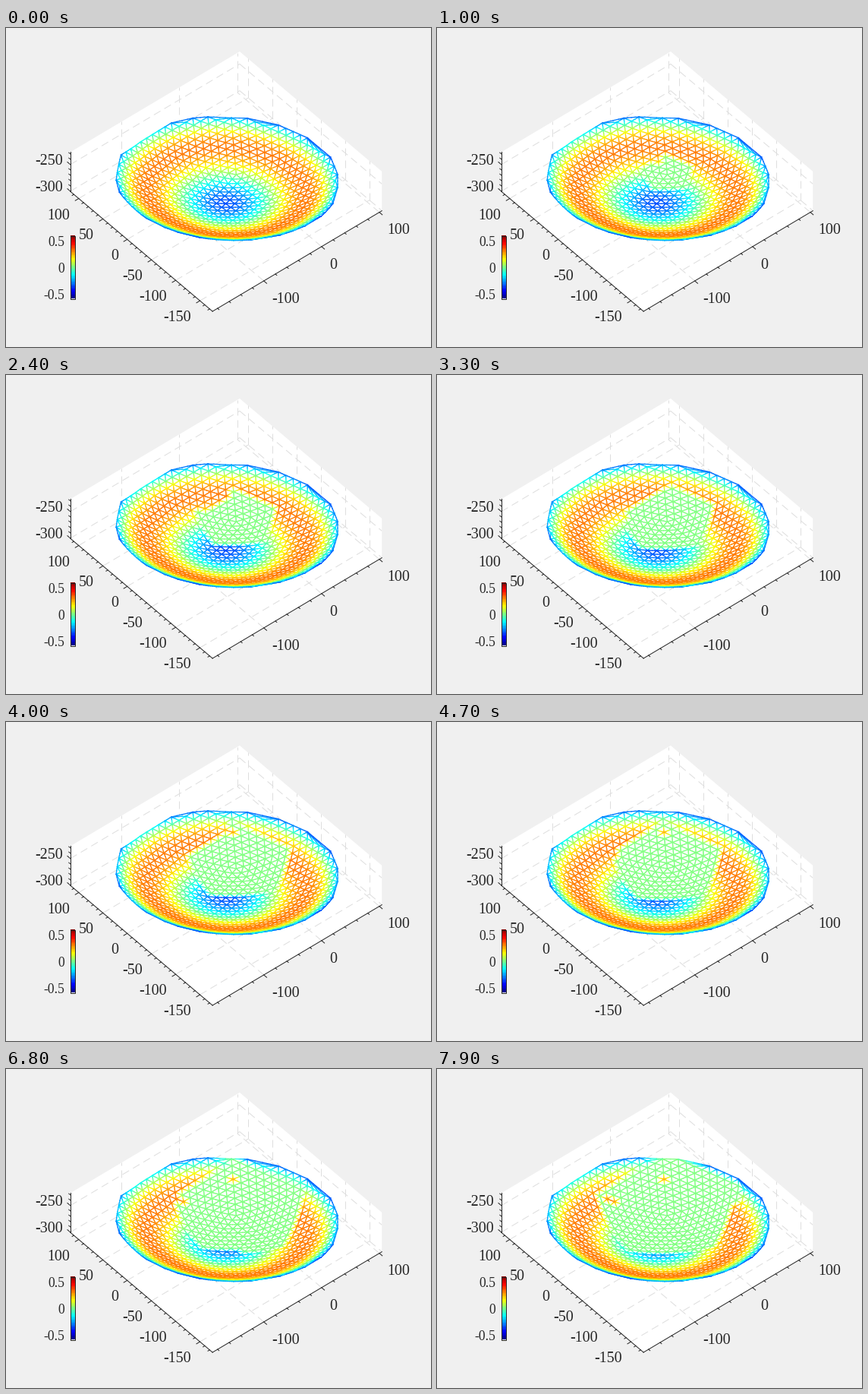
Animation, 560 px wide and 420 px high, one loop 8 s. Source, as a matplotlib script:

```python
import numpy as np
import matplotlib.pyplot as plt
from matplotlib.animation import FuncAnimation
from matplotlib.collections import LineCollection
from matplotlib.tri import Triangulation

W, H, DPI = 560, 420, 100
FRAMES, STEP = 80, 100
PX = 72 / DPI
INK = (0.15, 0.15, 0.15)
GRID = (0.87, 0.87, 0.87)

# Orthographic view: azimuth -40, elevation 45
LO = np.array([-188.7, -175.9, -300.4])
HI = np.array([104.3, 117.3, -226.6])
SCALE = 0.994
CA, SA = np.cos(np.radians(40)), np.sin(np.radians(40))
S45 = np.sqrt(0.5)


def project(p):
    q = np.asarray(p, float) - (LO + HI) / 2
    x, y, z = q[..., 0], q[..., 1], q[..., 2]
    u = 290 + SCALE * (CA * x - SA * y)
    v = 202 - SCALE * S45 * (SA * x + CA * y + z)
    return np.stack([u, v], axis=-1)


def jet(t):
    t = np.asarray(t, float)[..., None]
    return np.clip(1.5 - np.abs(4 * t - np.array([3, 2, 1])), 0, 1)


# Geodesic dish: five icosahedron faces around the pole, rings counted from it
R = 300.4
FREQ = 32
AXIS = -np.array([0.1642, 0.1228, 0.9788])
AXIS /= np.linalg.norm(AXIS)
POLE = np.array([0.0, 0.0, -1.0])
STUCK = {(6, 0, 0), (7, 4, 0), (8, 4, 0)}


def vertex(i):
    a, t = np.radians(54 - 72 * i), np.arctan(2)
    return np.array([np.sin(t) * np.cos(a), np.sin(t) * np.sin(a), -np.cos(t)])


def slerp(a, b, t):
    w = np.arccos(np.clip(a @ b, -1, 1))
    return (np.sin((1 - t) * w) * a + np.sin(t * w) * b) / np.sin(w)


def row_point(p, q, s, a, b, c):
    t = 1 - a / FREQ
    return slerp(slerp(p, q, t), slerp(p, s, t), c / (b + c))


def face_point(i, ring, j):
    """Mean of the three great-circle rows that meet at one node."""
    p, q, s = POLE, vertex(i), vertex(i + 1)
    a, b, c = FREQ - ring, ring - j, j
    m = (row_point(p, q, s, a, b, c) + row_point(q, s, p, b, c, a)
         + row_point(s, p, q, c, a, b))
    return m / np.linalg.norm(m)


def build_nodes():
    pts, free = [POLE], [True]
    for ring in range(1, 25):
        for i in range(5):
            for j in range(ring):
                p = face_point(i, ring, j)
                if R * np.linalg.norm(np.cross(p, AXIS)) <= 150:
                    pts.append(p)
                    free.append((ring, i, j) not in STUCK)
    return R * np.array(pts), np.array(free)


nodes, free = build_nodes()
order = np.arange(len(nodes))

# Offset between the sphere and the ideal paraboloid
drop = 0.36
depth = nodes @ AXIS
rho2 = R ** 2 - depth ** 2
offset = (rho2 / (4 * (0.466 * R + drop)) - R - drop + depth) * depth / R

tri = Triangulation(nodes[:, 0], nodes[:, 1])
edges = tri.edges
flat = project(nodes)

# Each edge is split so its colour can blend from end to end
PARTS = 4
cuts = np.linspace(0, 1, PARTS + 1)
mids = (cuts[:-1] + cuts[1:]) / 2
ends_a, ends_b = flat[edges[:, 0]], flat[edges[:, 1]]
line = ends_a[:, None] + cuts[None, :, None] * (ends_b - ends_a)[:, None]
segments = np.stack([line[:, :-1], line[:, 1:]], axis=2).reshape(-1, 2, 2)


def edge_colors(values):
    a, b = values[edges[:, 0], None], values[edges[:, 1], None]
    v = a + (b - a) * mids
    return jet((v.ravel() + 0.6) / 1.2)


fig = plt.figure(figsize=(W / DPI, H / DPI), dpi=DPI, facecolor="#f0f0f0")
ax = fig.add_axes([0, 0, 1, 1])
ax.axis("off")


def stroke(p, q, color=INK, width=1.0, **kw):
    ax.plot([p[0], q[0]], [p[1], q[1]], color=color, lw=width * PX, **kw)


def label(x, y, text, ha, size=20):
    ax.text(x, y + 0.33 * size, text, ha=ha, va="baseline", color=INK,
            family="Liberation Serif", size=size * PX, zorder=6)


def grid_line(p, q):
    stroke(*project([p, q]), color=GRID, dashes=(10, 6), zorder=1)


(x0, y0, z0), (x1, y1, z1) = LO, HI

# White walls and floor
box = project([(x0, y1, z1), (x1, y1, z1), (x1, y0, z1),
               (x1, y0, z0), (x0, y0, z0), (x0, y1, z0)])
ax.fill(*box.T, color="white", lw=0, zorder=0)

for x in (-100, 0, 100):
    grid_line((x, y0, z0), (x, y1, z0))
    grid_line((x, y1, z0), (x, y1, z1))
for y in range(-150, 101, 50):
    grid_line((x0, y, z0), (x1, y, z0))
    grid_line((x1, y, z0), (x1, y, z1))
for z in (-300, -250):
    grid_line((x0, y1, z), (x1, y1, z))
    grid_line((x1, y1, z), (x1, y0, z))

# Axis lines, ticks and tick labels
corner = (x0, y0, z0)
for end in ((x1, y0, z0), (x0, y1, z0)):
    stroke(*project([corner, end]), zorder=2)
stroke(*project([(x0, y1, z0), (x0, y1, z1)]), zorder=2)


def ticks(axis, start, minor, major, base, out, shift, ha):
    for v in np.arange(start, HI[axis], minor):
        if v < LO[axis]:
            continue
        p = np.array(base, float)
        p[axis] = v
        big = v % major == 0
        q = p + np.array(out) * (6 if big else 3)
        a, b = project([p, q])
        stroke(a, b, zorder=2)
        if big:
            label(a[0] + shift[0], a[1] + shift[1], f"{v:.0f}", ha)


ticks(0, -180, 20, 100, corner, (0, -1, 0), (10.8, 22.2), "left")
ticks(1, -170, 10, 50, corner, (-1, 0, 0), (-11.8, 20.4), "right")
ticks(2, -300, 10, 50, (x0, y1, z0), (0, 1, 0), (-9.8, -6.2), "right")

# Colour bar
ramp = jet((np.arange(64) + 0.5) / 64)[::-1, None]
ax.imshow(ramp, extent=(84.5, 90.5, 356.5, 273.5), aspect="auto",
          interpolation="nearest", zorder=4)
ax.add_patch(plt.Rectangle((84.5, 273.5), 6, 83, fill=False, ec=INK,
                           lw=PX, zorder=5))
for v, y in (("0.5", 281), ("0", 316), ("-0.5", 351)):
    label(77.5, y, v, "right", 17.6)

# Dish surface and its wire mesh
ax.tripcolor(flat[:, 0], flat[:, 1], tri.triangles, np.zeros(len(flat)),
             cmap="gray_r", vmin=0, vmax=1, edgecolors="none", zorder=3)
mesh = LineCollection(segments, linewidths=1.3 * PX, capstyle="projecting",
                      zorder=3.5)
ax.add_collection(mesh, autolim=False)
ax.set_xlim(0, W)
ax.set_ylim(H, 0)


def draw(frame):
    done = (order < 3 * frame) & free
    mesh.set_color(edge_colors(np.where(done, 0, offset)))
    return [mesh]


anim = FuncAnimation(fig, draw, frames=FRAMES, interval=STEP,
                     repeat=True, repeat_delay=0)
plt.show()
```
